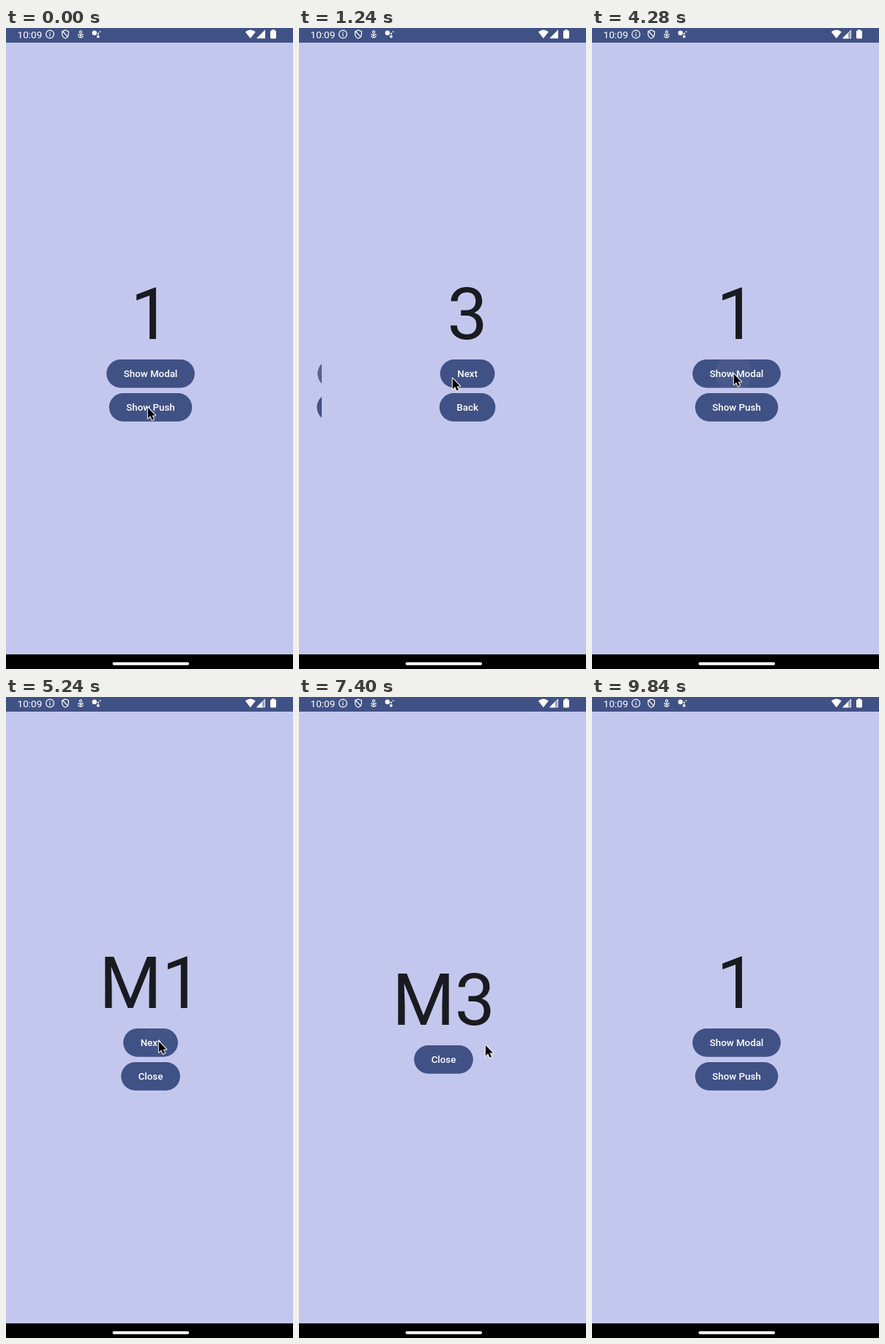
Write an HTML page with a canvas that moves like this. It is 392x876 px and loops after 9880 ms.

```html
<!DOCTYPE html>
<html lang="en">
<head>
<meta charset="utf-8">
<title>Push and modal navigation</title>
<style>
  html, body { margin: 0; width: 100%; height: 100%; overflow: hidden; background: #000; }
  canvas { display: block; width: 392px; height: 876px; }
</style>
</head>
<body>
<canvas id="stage"></canvas>
<script>
const W = 392, H = 876, LOOP = 9880, FRAME = 40;
const TOP = 20, BOTTOM = 856, CENTER = 197.5, PARALLAX = 0.375, SLIDE = 300;
const PAPER = '#c4c7ed', BLUE = '#405185', INK = '#1a1b20';

const canvas = document.getElementById('stage');
const scale = window.devicePixelRatio || 1;
canvas.width = W * scale;
canvas.height = H * scale;
const ctx = canvas.getContext('2d');

const pages = {
  1: ['Show Modal', 'Show Push'],
  2: ['Next', 'Back'],
  3: ['Next', 'Back'],
  4: ['CLOSE'],
  M1: ['Next', 'Close'],
  M2: ['Next', 'Back'],
  M3: ['Close']
};

// Pages slide over one another; "skip" hides the first part of an entrance.
const slides = [
  { at: 380, from: '1', to: '2' },
  { at: 1042, from: '2', to: '3', skip: 110 },
  { at: 2100, from: '3', to: '4', skip: 130 },
  { at: 3110, from: '4', to: '1', back: true },
  { at: 4400, from: '1', to: 'M1', vertical: true, skip: 140 },
  { at: 5310, from: 'M1', to: 'M2' },
  { at: 7044, from: 'M2', to: 'M3' },
  { at: 8080, from: 'M3', to: '1', vertical: true, back: true }
];

const presses = [
  { at: 260, page: '1', button: 1, x: 193, y: 518 },
  { at: 1020, page: '2', button: 0, x: 209, y: 478 },
  { at: 2080, page: '3', button: 0, x: 209, y: 478 },
  { at: 2800, page: '4', button: 0, x: 205, y: 492 },
  { at: 4250, page: '1', button: 0, x: 193, y: 472 },
  { at: 5230, page: 'M1', button: 0, x: 208, y: 470 },
  { at: 6940, page: 'M2', button: 0, x: 208, y: 470 },
  { at: 7720, page: 'M3', button: 0, x: 205, y: 498 }
];

// [time, x, y]
const pointerPath = [
  [0, 193, 518], [560, 193, 518], [840, 209, 478],
  [2240, 209, 478], [2520, 253, 476], [2680, 253, 476], [2840, 205, 492],
  [3200, 205, 492], [3520, 215, 568], [4000, 193, 472],
  [4720, 193, 472], [5000, 208, 470],
  [7200, 208, 470], [7400, 254, 475], [7560, 254, 475], [7760, 205, 498],
  [8120, 205, 498], [8400, 302, 641], [LOOP, 302, 641]
];

const clamp = v => Math.max(0, Math.min(1, v));
const smooth = v => v * v * (3 - 2 * v);

// Cubic bezier (0.4, 0, 0.2, 1), solved by bisection.
function ease(x) {
  if (x <= 0 || x >= 1) return clamp(x);
  let low = 0, high = 1;
  for (let i = 0; i < 24; i++) {
    const s = (low + high) / 2, r = 1 - s;
    if (1.2 * s * r * r + 0.6 * s * s * r + s * s * s < x) low = s;
    else high = s;
  }
  return smooth(low);
}

function circle(x, y, r) {
  ctx.beginPath();
  ctx.arc(x, y, r, 0, 7);
}

function disc(x, y, r) {
  circle(x, y, r);
  ctx.fill();
}

function pill(x, y, w, h) {
  ctx.beginPath();
  ctx.roundRect(x, y, w, h, h / 2);
}

function label(text, x, y, font, color, align = 'center') {
  ctx.font = font + ' Roboto, sans-serif';
  ctx.fillStyle = color;
  ctx.textAlign = align;
  ctx.fillText(text, x, y);
}

function drawRipple(press, t) {
  const age = t - press.at;
  if (age <= 0 || age > 640) return;
  const alpha = 0.1 * clamp(age / 75) * clamp((640 - age) / 180);
  ctx.save();
  ctx.clip();
  ctx.fillStyle = `rgba(255,255,255,${alpha})`;
  disc(press.x, press.y, 22 + 68 * ease(age / 225));
  ctx.restore();
}

function drawButton(text, top, press, t) {
  ctx.font = '500 13.3px Roboto, sans-serif';
  const width = ctx.measureText(text).width + 47;
  pill(CENTER - width / 2, top, width, 38.7);
  ctx.fillStyle = BLUE;
  ctx.fill();
  if (press) drawRipple(press, t);
  label(text, CENTER, top + 24, '500 13.3px', '#fff');
}

function drawPage(name, dx, dy, t) {
  const buttons = pages[name];
  const shift = buttons.length === 1 ? 23 : 0;
  ctx.save();
  ctx.translate(dx, dy);
  ctx.fillStyle = PAPER;
  ctx.fillRect(-1.5, TOP, W + 6, BOTTOM - TOP);
  label(name, CENTER, 425 + shift, '98px', INK);
  buttons.forEach((text, i) => {
    const press = presses.find(p =>
      p.page === name && p.button === i && t >= p.at && t < p.at + 700);
    drawButton(text, 453 + shift + 46 * i, press, t);
  });
  ctx.restore();
}

function drawPages(t) {
  const slide = slides.filter(s => s.at <= t).pop();
  if (!slide) return drawPage('1', 0, 0, t);
  const age = t - slide.at;
  if (age >= SLIDE) return drawPage(slide.to, 0, 0, t);
  const progress = age < (slide.skip || 0) ? 0 : ease(age / SLIDE);
  const cover = slide.back ? 1 - progress : progress;
  const [lower, upper] = slide.back ? [slide.to, slide.from] : [slide.from, slide.to];
  if (slide.vertical) {
    drawPage(lower, 0, 0, t);
    drawPage(upper, 0, (BOTTOM - TOP) * (1 - cover), t);
  } else {
    drawPage(lower, -PARALLAX * W * cover, 0, t);
    drawPage(upper, W * (1 - cover), 0, t);
  }
}

function fillPath(d) {
  ctx.fill(new Path2D(d));
}

function drawStatusBar(t) {
  ctx.fillStyle = BLUE;
  ctx.fillRect(0, 0, W, TOP);
  label('10:09', 15.5, 13.5, '13.6px', '#fff', 'left');
  ctx.strokeStyle = '#fff';

  // Info
  ctx.lineWidth = 1.2;
  circle(60, 8.5, 5.4);
  ctx.stroke();
  ctx.fillRect(59.4, 7.7, 1.2, 3.8);
  ctx.fillRect(59.4, 5.4, 1.2, 1.3);

  // Crossed shield
  ctx.stroke(new Path2D('M81 3 L85.4 4.7 V8 C85.4 11 83.5 13.2 81 14.2 C78.5 13.2 76.6 11 76.6 8 V4.7 Z M76.8 4 L84.8 12.6'));

  // Small figure
  ctx.lineWidth = 1.1;
  circle(102, 5.5, 1.6);
  ctx.stroke();
  ctx.stroke(new Path2D('M98.3 8.2 L102 10.3 L105.7 8.2 M98.6 10.6 Q99.4 13.2 102 13.2 Q104.6 13.2 105.4 10.6 M102 8 V13'));

  // Dots
  disc(120.8, 6.8, 3.2);
  disc(125.8, 11.7, 1.9);
  disc(125.9, 7.6, 1.2);
  disc(128.6, 5.2, 0.9);

  // Wi-Fi, signal, battery
  fillPath('M326.8 5.2 Q333.8 -0.4 340.8 5.2 L333.8 14.2 Z');
  const signal = 'M342 14.2 L354 2.2 V14.2 Z';
  if (t < 3120) {
    fillPath(signal);
  } else {
    ctx.globalAlpha = 0.45;
    fillPath(signal);
    ctx.globalAlpha = 1;
    fillPath('M342 14.2 L350 6.2 V14.2 Z');
    ctx.lineWidth = 0.8;
    ctx.stroke(new Path2D('M343 13.8 L353.6 3.2 V13.8 Z'));
  }
  ctx.beginPath();
  ctx.roundRect(361, 3.4, 8, 11, 1.3);
  ctx.fill();
  ctx.fillRect(363.2, 2.2, 3.6, 2);
}

function drawNavigationBar() {
  ctx.fillStyle = '#000';
  ctx.fillRect(0, BOTTOM, W, H - BOTTOM);
  ctx.fillStyle = '#fff';
  pill(145.5, 866.8, 104.5, 4);
  ctx.fill();
}

function drawPointer(t) {
  const i = pointerPath.findIndex(p => p[0] > t);
  const [t0, x0, y0] = pointerPath[i - 1], [t1, x1, y1] = pointerPath[i];
  const k = smooth((t - t0) / (t1 - t0));
  ctx.save();
  ctx.globalAlpha = clamp((9080 - t) / 280);
  ctx.translate(x0 + (x1 - x0) * k + 0.8, y0 + (y1 - y0) * k + 0.8);
  const arrow = new Path2D('M0 0 V14.6 L3.3 11.5 L5.7 17 L8.2 15.9 L5.8 10.6 H10.3 Z');
  ctx.lineJoin = 'round';
  ctx.lineWidth = 2;
  ctx.strokeStyle = '#fff';
  ctx.stroke(arrow);
  ctx.fillStyle = '#000';
  ctx.fill(arrow);
  ctx.restore();
}

function draw(now) {
  const t = Math.floor((now % LOOP) / FRAME) * FRAME;
  ctx.setTransform(scale, 0, 0, scale, 0, 0);
  drawPages(t);
  drawStatusBar(t);
  drawNavigationBar();
  drawPointer(t);
}

let start;
function tick(now) {
  start ??= now;
  draw(Math.max(0, now - start));
  requestAnimationFrame(tick);
}
draw(0);
requestAnimationFrame(tick);
</script>
</body>
</html>
```
